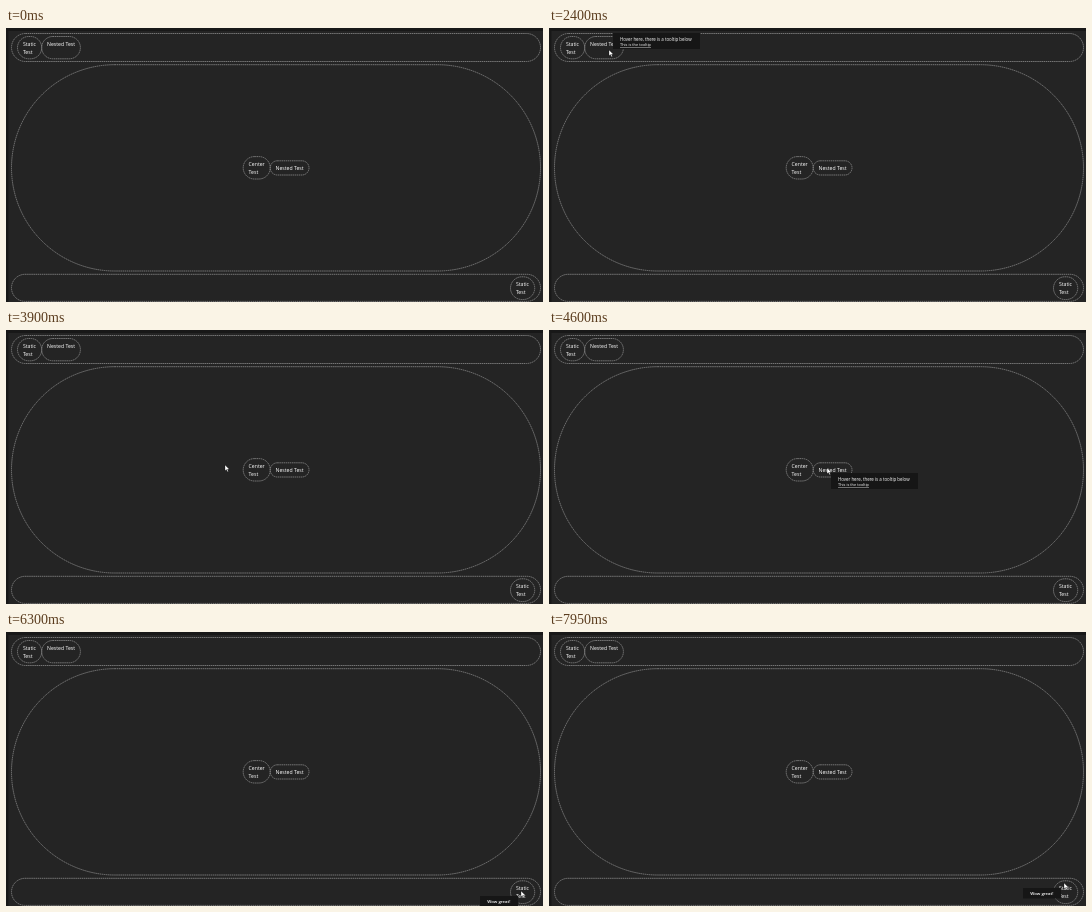
An HTML page for the animation above (8000 ms loop, 537x274 px).

```html
<!DOCTYPE html>
<html lang="en">
<head>
<meta charset="utf-8">
<style>
  html, body { margin: 0; width: 100%; height: 100%; overflow: hidden; background: #242424; }
  svg { display: block; width: 537px; height: 274px; }
  text { font: 500 5.15px "Open Sans", "Noto Sans", sans-serif; fill: #fff; }
  .pill { fill: none; stroke: #999; stroke-width: .7; stroke-dasharray: 1.5 .6; }
  .tip rect { fill: #161616; }
  .tip text { font-size: 4.4px; }
  .tip .bold { font-size: 4.3px; font-weight: 600; }
  .tip .link { font-size: 3.9px; text-decoration: underline; }
</style>
</head>
<body>
<svg viewBox="0 0 537 274">
  <path d="M0 0H537V3H2.5V274H0Z" fill="#181818"/>
  <g id="scene"></g>
  <g id="short" class="tip">
    <rect width="38" height="10.5"/>
    <text class="bold" x="7.3" y="6.8">Wow great!</text>
  </g>
  <g id="long" class="tip">
    <rect width="87" height="16"/>
    <text x="7" y="7.8">Hover here, there is a tooltip below</text>
    <text class="link" x="7" y="13.2">This is the tooltip</text>
  </g>
  <path id="arrow" d="M0 0V5.8L1.4 4.6L2.4 6.8L3.4 6.4L2.5 4.3H4.3Z" fill="#fff" stroke="#000" stroke-width=".3"/>
  <path id="beam" d="M0 0H2M1 0V5M0 5H2" fill="none" stroke="#ddd" stroke-width=".6"/>
</svg>
<script>
const LOOP = 8000, STEP = 50;
const byId = id => document.getElementById(id);

function add(tag, attrs, content = '') {
  const node = document.createElementNS('http://www.w3.org/2000/svg', tag);
  for (const key in attrs) node.setAttribute(key, attrs[key]);
  node.textContent = content;
  byId('scene').append(node);
}

// A fully rounded box with its lines of text.
function pill(x, y, width, height, ...lines) {
  add('rect', { class: 'pill', x, y, width, height, rx: height / 2 });
  lines.forEach((line, i) => add('text', { x: x + 5.4, y: y + 9.6 + i * 8 }, line));
  return { x, y, width, height };
}

pill(5.5, 5.5, 529, 28);
pill(5.5, 36.7, 529, 206.3);
pill(5.5, 246.3, 529, 27.1);
pill(237.2, 128.6, 27, 22.4, 'Center', 'Test');
const topStatic = pill(11.5, 8.5, 24.2, 22.3, 'Static', 'Test');
const topNested = pill(35.7, 8.5, 38.7, 22.3, 'Nested Test');
const centerNested = pill(264.2, 132.8, 38.8, 14.2, 'Nested Test');
const bottomStatic = pill(504.5, 248.8, 24.2, 22.7, 'Static', 'Test');

// Tooltip of each hoverable pill and its offset from the pointer.
const hovers = [
  { area: topStatic, tip: 'short', dx: 5, dy: 5 },
  { area: topNested, tip: 'long', dx: 4, dy: -17 },
  { area: centerNested, tip: 'long', dx: 4, dy: 5 },
  { area: bottomStatic, tip: 'short', dx: -41, dy: 5 }
];

// The pointer rests between its glides.
const entry = { time: 50, x: 39, y: 183 };
const glides = [
  { from: 50, to: 150, x: 77, y: 154 },
  { from: 250, to: 750, x: 58, y: 27 },
  { from: 750, to: 1100, x: 22, y: 26 },
  { from: 1100, to: 1250, x: 18, y: 22 },
  { from: 1450, to: 1850, x: 57, y: 22 },
  { from: 2200, to: 2400, x: 60, y: 22 },
  { from: 2950, to: 3900, x: 219, y: 135 },
  { from: 3900, to: 4650, x: 282, y: 138 },
  { from: 4650, to: 5450, x: 469, y: 240 },
  { from: 5450, to: 5900, x: 513, y: 258 },
  { from: 6250, to: 6500, x: 522, y: 265 },
  { from: 6700, to: 6950, x: 523, y: 266 },
  { from: 7400, to: 7950, x: 515, y: 251 }
];

function pointerAt(time) {
  let { x, y } = entry;
  for (const glide of glides) {
    const k = Math.min(1, Math.max(0, (time - glide.from) / (glide.to - glide.from)));
    x += (glide.x - x) * k;
    y += (glide.y - y) * k;
  }
  return { x: Math.round(x), y: Math.round(y) };
}

function place(id, shown, x, y) {
  byId(id).style.display = shown ? '' : 'none';
  byId(id).setAttribute('transform', `translate(${x} ${y})`);
}

function inside(point, area, inset = 0) {
  return Math.abs(point.x - area.x - area.width / 2) <= area.width / 2 - inset
    && Math.abs(point.y - area.y - area.height / 2) <= area.height / 2 - inset;
}

function draw(now) {
  const time = Math.floor(now % LOOP / STEP) * STEP;
  const visible = time >= entry.time;
  const pointer = pointerAt(time);
  const hover = hovers.find(({ area }) => inside(pointer, area));
  for (const id of ['short', 'long']) {
    place(id, hover?.tip === id, pointer.x + (hover?.dx ?? 0), pointer.y + (hover?.dy ?? 0));
  }
  const overText = inside(pointer, topStatic, 4);
  place('arrow', visible && !overText, pointer.x, pointer.y);
  place('beam', visible && overText, pointer.x, pointer.y);
  requestAnimationFrame(draw);
}
requestAnimationFrame(draw);
</script>
</body>
</html>
```
